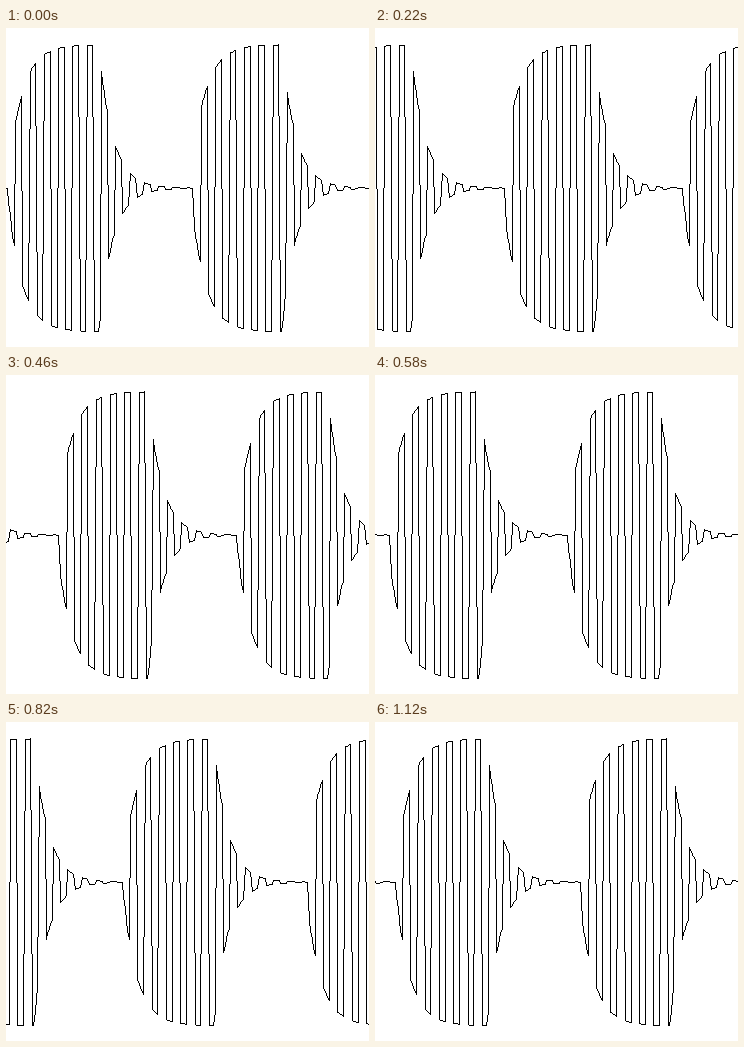
Write an HTML page with a canvas that moves like this. It is 363 by 319 pixels and loops after 1180 ms.

```html
<!DOCTYPE html>
<html lang="en">
<head>
<meta charset="utf-8">
<title>Gated square wave</title>
<style>
  html, body { margin: 0; width: 100%; height: 100%; overflow: hidden; background: #fff; }
  canvas { display: block; width: 363px; height: 319px; }
</style>
</head>
<body>
<canvas id="scope" width="363" height="319"></canvas>
<script>
const W = 363, H = 319;
const MID = 159.72, AMP = 143.5;
const SAMPLES = 254, DX = W / SAMPLES, X0 = 1.2;
const HALF = 5, GATE = 64, SECOND = 130;
const RATE = Math.pow(0.6, 1 / HALF);
const STEPS = 19, FIRST = 100, STEP = 60, LOOP = FIRST + (STEPS - 1) * STEP;

const ctx = document.getElementById('scope').getContext('2d');

// Square wave whose envelope charges while the gate is open, then decays.
function sample(i) {
  i = (i % SAMPLES + SAMPLES) % SAMPLES;
  const late = i >= SECOND;
  const n = late ? i - SECOND : i;
  if (n === 0) return 0;
  const age = late ? n + 2 : n;
  const env = age <= GATE ? 1 - RATE ** age : RATE ** (age - GATE);
  const sign = Math.floor((n - 1) / HALF) % 2 ? -1 : 1;
  return sign * env * AMP;
}

// One pixel wide line without antialiasing.
function line(x, y, x2, y2) {
  const dx = Math.abs(x2 - x), dy = Math.abs(y2 - y);
  const sx = x < x2 ? 1 : -1, sy = y < y2 ? 1 : -1;
  let err = dx - dy;
  for (;;) {
    ctx.fillRect(x, y, 1, 1);
    if (x === x2 && y === y2) return;
    const e = 2 * err;
    if (e > -dy) { err -= dy; x += sx; }
    if (e < dx) { err += dx; y += sy; }
  }
}

// The trace scrolls by whole pixels, so its shape never changes.
function draw(step) {
  const shift = Math.round(step * W / STEPS);
  const first = Math.floor((shift - X0) / DX) - 1;
  const px = i => Math.floor(X0 + i * DX) - shift;
  const py = i => Math.round(MID + sample(i));
  ctx.fillStyle = '#fff';
  ctx.fillRect(0, 0, W, H);
  ctx.fillStyle = '#000';
  for (let i = first; i < first + SAMPLES + 4; i++) {
    line(px(i), py(i), px(i + 1), py(i + 1));
  }
}

const start = performance.now();
let shown = -1;

function tick() {
  const t = (performance.now() - start) % LOOP;
  const step = t < FIRST ? 0 : 1 + Math.floor((t - FIRST) / STEP);
  if (step !== shown) draw(shown = step);
  requestAnimationFrame(tick);
}
tick();
</script>
</body>
</html>
```
